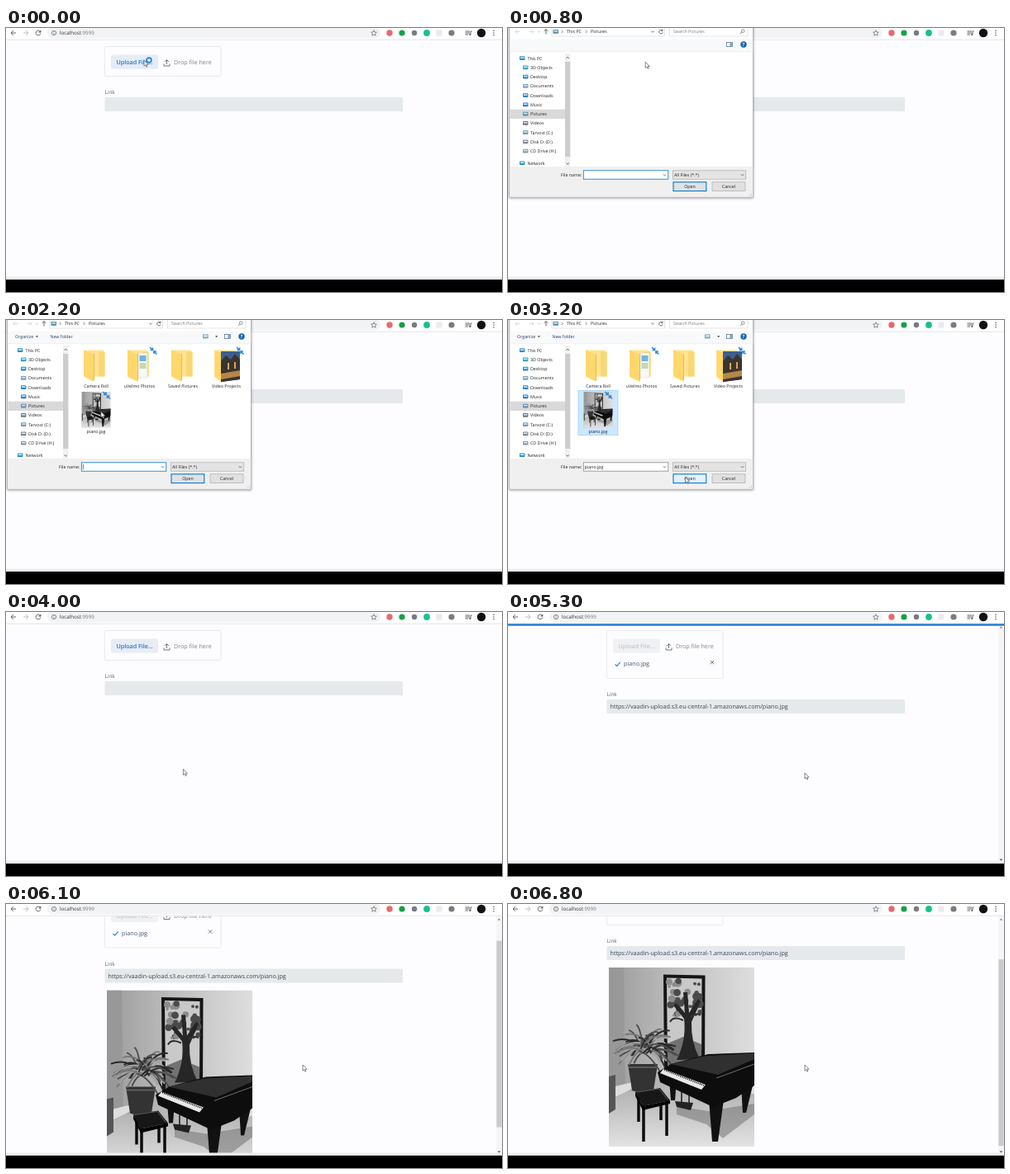
Animation, 600 px wide and 320 px high, one loop 7300 ms. Source, as an HTML page:

```html
<!DOCTYPE html>
<html lang="en">
<head>
<meta charset="utf-8">
<title>File upload</title>
<style>
  html, body { margin: 0; width: 100%; height: 100%; overflow: hidden; background: #fdfcfe; }
  svg { display: block; width: 600px; height: 320px; }
  text { font-family: "Open Sans", "Noto Sans", sans-serif; text-rendering: geometricPrecision; white-space: pre; }
</style>
</head>
<body>
<svg id="stage" viewBox="0 0 600 320" xmlns="http://www.w3.org/2000/svg"></svg>
<script>
const LOOP = 7300, STEP = 100;

// Markup helpers
const text = (x, y, s, size = 5.3, fill = '#222', more = '') =>
  `<text x="${x}" y="${y}" font-size="${size}" fill="${fill}" ${more}>${s}</text>`;
const rect = (x, y, w, h, fill, more = '') =>
  `<rect x="${x}" y="${y}" width="${w}" height="${h}" fill="${fill}" ${more}/>`;
const dot = (x, y, r, fill, more = '') => `<circle cx="${x}" cy="${y}" r="${r}" fill="${fill}" ${more}/>`;
const shape = (d, fill, more = '') => `<path d="${d}" fill="${fill}" ${more}/>`;
const line = (d, color, w = .8, more = '') =>
  `<path d="${d}" fill="none" stroke="${color}" stroke-width="${w}" ${more}/>`;
const group = (id, body, more = '') => `<g id="${id}" ${more}>${body}</g>`;
const use = (id, x, y, scale = 1) => `<use href="#${id}" transform="translate(${x} ${y}) scale(${scale})"/>`;
const range = (n, fn) => Array.from({ length: n }, (_, i) => fn(i)).join('');

function seeded(seed) {
  return () => (seed = (seed * 16807) % 2147483647) / 2147483647;
}

// Room with a piano, 176 x 217
function photo() {
  const rnd = seeded(41);
  const leaves = range(58, i => {
    const a = -Math.PI * (rnd() * 1.5 - .25), r = 17 + rnd() * 20;
    const x = 44 + (rnd() - .5) * 14, y = 90 + rnd() * 14;
    const ex = x + Math.cos(a) * r, ey = y + Math.sin(a) * r * .95;
    const tone = ['#292929', '#4c4c4c', '#777', '#a4a4a4'][i % 4];
    return line(`M${x} ${y}Q${(x + ex) / 2} ${(y + ey) / 2 - 8} ${ex} ${ey + 4}`, tone, 1.9, 'stroke-linecap="round"');
  });
  const foliage = range(34, i =>
    dot(72 + rnd() * 39, 16 + rnd() * 42, 1.5 + rnd() * 3.5, i % 3 ? '#4a4a4a' : '#8b8b8b'));
  return rect(0, 0, 176, 217, 'url(#wall)')
    + shape('M0 0H18L20 150L0 158Z', '#989898')
    + shape('M0 162L22 150L176 153V217H0Z', 'url(#floor)')
    + shape('M0 132L8 130V172L0 177Z', '#555')
    + shape('M8 144L28 139V147L8 157Z', '#ddd')
    + shape('M66 8.5L116.5 9.5L116 122L67 126Z', '#151515')
    + shape('M70 12.5L112.5 13.5L112 118L71 121Z', '#c9c9c9')
    + foliage
    + shape('M71 92L90 84L112 93V119H71Z', '#727272')
    + shape('M82 112Q94 88 91 62L78 46L82 43L92 55L90 30H95L97 55L108 38L111 41L100 66Q99 90 110 111Z', '#262626')
    + line('M90 64Q78 58 74 66M99 60Q106 54 111 58', '#303030', 2)
    + shape('M23 117H59L54 149Q40 154 28 149Z', '#333')
    + line('M24 121H58', '#666', 1.5)
    + leaves
    + shape('M82 168L120 174L176 165V178L138 207L118 190L82 178Z', '#6d6d6d', 'opacity=".5"')
    + shape('M73 136H82L80 161H75Z', '#111')
    + shape('M160 143H174L166 176H162Z', '#111')
    + shape('M121 160H139L132 211H125Z', '#111')
    + line('M88 151V167M97 154V169', '#222', 1.6)
    + shape('M80 162L102 164L99 173L82 169Z', '#222')
    + shape('M59 127L75 117L120 105L176 103V143L154 158L126 169L62 139Z', '#0d0d0d')
    + shape('M75 117L118 107L176 104V111L132 130Z', '#303030')
    + shape('M66 123L117 142L112 148L62 128Z', '#e8e8e8')
    + line('M67 124L115 143', '#222', 1.8, 'stroke-dasharray="1.2 1.1"')
    + line('M130 134L176 117', '#888', .8)
    + line('M42 165V211M70 159V204M36 153V187M63 165V185', '#0c0c0c', 3.5)
    + shape('M32 151L62 146L74 161L41 168Z', '#171717')
    + line('M34 151L61 147L71 160', '#777', .7)
    + shape('M32 151L41 168L74 161V165L41 173L32 156Z', '#050505');
}

const defs = `<defs>
  <linearGradient id="wall"><stop offset="0" stop-color="#9b9b9b"/><stop offset=".45" stop-color="#bdbdbd"/><stop offset="1" stop-color="#dedede"/></linearGradient>
  <linearGradient id="floor" x2="0" y2="1"><stop offset="0" stop-color="#b4b4b4"/><stop offset="1" stop-color="#e2e2e2"/></linearGradient>
  <filter id="shadow" x="-5%" y="-5%" width="112%" height="112%"><feDropShadow dx="0" dy="1" stdDeviation="1.4" flood-opacity=".4"/></filter>
  <clipPath id="view"><rect y="14.5" width="600" height="289"/></clipPath>
  <clipPath id="frame"><rect width="176" height="217"/></clipPath>
  <g id="photo" clip-path="url(#frame)">${photo()}</g>
  <g id="folder">${shape('M0 1H23L26 4V33H0Z', '#ffe394') + shape('M18 3H25V33H18Z', '#f9d775')
    + shape('M0 1L12 6V39L0 33Z', '#ffd76b') + shape('M12 6L13 5V37L12 39Z', '#e8bd50')}</g>
  <g id="doc">${shape('M0 0H22L30 8V40H0Z', '#f7f7f8', 'stroke="#d6d6d8" stroke-width=".7"')
    + shape('M22 0V8H30Z', '#e6e6e8', 'stroke="#d0d0d2" stroke-width=".5"')}</g>
  <g id="sync">${line('M0 0L3.4 3.4M3.6 .6V3.6H.6M8.5 8.5L5.1 5.1M4.9 7.9V4.9H7.9', '#2b8ae0', 1.5)}</g>
</defs>`;

function toolbar() {
  return rect(0, 0, 600, 14, '#fff') + rect(0, 13.7, 600, .8, '#dddfe2')
    + rect(50, -1, 403, 13.5, '#f1f3f4', 'rx="6.5"')
    + line('M12 6H6M8.8 3.2L6 6L8.8 8.8', '#50555a', .9)
    + line('M21 6H27M24.2 3.2L27 6L24.2 8.8', '#b5b8bb', .9)
    + line('M41.4 4.2A2.9 2.9 0 1 0 41.9 6.6', '#50555a', .9) + shape('M42.3 2.6V5.6H39.3Z', '#50555a')
    + dot(58, 6, 2.7, 'none', 'stroke="#5f6368" stroke-width=".7"') + line('M58 5.5V7.6M58 4.2V4.9', '#5f6368', .7)
    + text(65, 8.3, 'localhost<tspan fill="#74787c">:9999</tspan>', 6.2, '#303338')
    + shape('M445 2.7L446 5L448.4 5.2L446.6 6.8L447.1 9.2L445 7.9L442.9 9.2L443.4 6.8L441.6 5.2L444 5Z', 'none', 'stroke="#5f6368" stroke-width=".7"')
    + dot(464, 6, 3.7, '#e9686b') + dot(479, 6, 3.6, '#15a04a') + dot(494, 6, 3.2, '#777b80')
    + dot(509, 6, 3.9, '#18c28d') + rect(520.5, 2.5, 7, 7, '#eceaec')
    + dot(539, 6, 3.6, '#777c83')
    + line('M555.5 4H561M555.5 6H561M555.5 8H559M562 8V4H563.7', '#50555a', .9) + dot(561.2, 8.1, 1, '#50555a')
    + dot(575, 6, 5.2, '#111')
    + dot(590, 3.2, .8, '#50555a') + dot(590, 6, .8, '#50555a') + dot(590, 8.8, .8, '#50555a');
}

function page() {
  const link = 'https://vaadin-upload.s3.eu-central-1.amazonaws.com/piano.jpg';
  return rect(119.5, 22.5, 140.5, 36, 'none', 'id="card" rx="1.5" stroke="#e4e6ec" stroke-width=".8"')
    + rect(127, 32.5, 57, 17, '#e8edf5', 'id="button" rx="2"')
    + text(133.5, 44, 'Upload File...', 7.15, '#2374d2', 'id="caption" font-weight="600"')
    + line('M194.5 44V38.7M192 41.1L194.5 38.5L197 41.1M191 43.5V46H198V43.5', '#5f6c7e', .9)
    + text(203, 44, 'Drop file here', 7.16, '#7b8492')
    + group('item',
        line('M129.6 63.3L131.7 65.5L135.8 60.8', '#2374d2', 1.1, 'id="check"')
        + text(140, 65, 'piano.jpg', 7.2, '#45536a')
        + line('M244.8 58.8L249.2 63.2M249.2 58.8L244.8 63.2', '#66717f', .9)
        + group('upload', rect(140, 70.5, 108, 1.6, '#e5e9ef') + rect(140, 70.5, 0, 1.6, '#2374d2', 'id="done"')))
    + group('lower',
        text(119.5, 80, 'Link', 6.4, '#59677c', 'font-weight="500"')
        + rect(119.5, 84, 360.5, 17, '#e5e9eb', 'rx="1.5"')
        + text(123.5, 95, link, 7.18, '#34445a', 'id="link" font-weight="500"'))
    + group('picture', use('photo', 122, 132));
}

function scrollbar() {
  return rect(593, 14.5, 7, 289, '#f5f4f6') + rect(593.4, 22, 6.2, 226, '#cbcacc', 'id="thumb"')
    + shape('M594.8 19.5H598.2L596.5 17.6Z', '#777') + shape('M594.6 299.5H598.4L596.5 301.7Z', '#555');
}

const places = ['This PC', '3D Objects', 'Desktop', 'Documents', 'Downloads', 'Music', 'Pictures', 'Videos',
  'Tarvost (C:)', 'Disk D: (D:)', 'CD Drive (H:)', 'Network'];
const tints = ['#2f8fce', '#35a6c8', '#1c88d8', '#7f9fb5', '#2b85d8', '#2a7fd0', '#5c8fae', '#6a7783', '#6f9bb8', '#808890', '#8f979d', '#2f8fce'];

function sidebar() {
  return rect(2.5, 98.7, 66.5, 11.3, '#d9d9d9')
    + places.map((name, i) => {
        const y = i === 11 ? 164 : 36.8 + i * 11.25, root = i % 11 === 0;
        const x = root ? 14 : 18;
        return rect(x, y - 2.5, 6.4, 4.6, tints[i], 'rx=".7"') + rect(x + 1, y - 1.5, 4.4, 1.5, '#d7ecf8')
          + text(root ? 23.5 : 27, y + 1.9, name);
      }).join('')
    + rect(69, 31, 6.3, 137, '#f0f0f0') + rect(69, 41, 6.3, 115, '#cdcdcd')
    + line('M70.5 36.8L72.2 35.1L73.9 36.8M70.5 163.5L72.2 165.2L73.9 163.5', '#555', .9);
}

function files() {
  const label = (x, y, s) => text(x, y, s, 5.3, '#222', 'text-anchor="middle"');
  return rect(137, 30, 49, 54.5, '#e5f3ff', 'id="hover"')
    + rect(85, 85.5, 48, 54, '#cce8ff', 'id="picked" stroke="#99d1ff" stroke-width=".8"')
    + use('folder', 94, 35.5) + use('folder', 147, 35.5) + use('folder', 200, 35.5)
    + group('plain', use('doc', 251.5, 34.5) + use('doc', 94, 89))
    + group('thumbs',
        rect(160, 40, 11, 30, '#f7f7f5', 'stroke="#ccc" stroke-width=".4"') + rect(161.5, 43, 8, 7, '#72b6d9')
        + rect(161.5, 52, 8, 7, '#c6d9b1') + shape('M147 36.5L159 41.5V74.5L147 68.5Z', '#ffd76b')
        + use('folder', 252.5, 35.5)
        + shape('M260 38H283V72L260 75Z', '#3d5f8b') + shape('M260 50L266 43L272 48L277 41L283 48V72L260 75Z', '#3b3430')
        + shape('M260 65L283 61V68L260 72Z', '#b78748') + rect(268, 52, 2, 8, '#d9a458') + rect(276, 51, 2, 8, '#d9a458')
        + shape('M252.5 36.5L260 40V74.5L252.5 69Z', '#ffd76b')
        + use('photo', 91.5, 87, .2)
        + use('sync', 174, 33) + use('sync', 279, 33) + use('sync', 117.5, 87))
    + label(109, 81.8, 'Camera Roll') + label(161.5, 81.8, 'uVelmo Photos')
    + label(214, 81.8, 'Saved Pictures') + label(266.5, 81.8, 'Video Projects') + label(109, 136.7, 'piano.jpg');
}

function dialog() {
  return rect(1.8, -6, 294.7, 211, '#fff', 'filter="url(#shadow)" stroke="#9b9b9b" stroke-width=".7"')
    + rect(53, -1, 136.5, 11, '#fff', 'stroke="#d9d9d9" stroke-width=".7"')
    + rect(195.5, -1, 94.5, 11, '#fff', 'stroke="#d9d9d9" stroke-width=".7"')
    + line('M14.5 4.5H9M11.3 2.2L9 4.5L11.3 6.8M25.5 4.5H31M28.7 2.2L31 4.5L28.7 6.8', '#d0d0d0', .8)
    + line('M36.2 3.8L37.5 5.1L38.8 3.8', '#aaa', .7)
    + line('M46 7.5V1.5M43.7 3.8L46 1.5L48.3 3.8', '#555', .9)
    + rect(54.5, 2, 6.5, 4.8, '#5c8fae') + rect(55.5, 3, 4.5, 1.5, '#d7ecf8')
    + line('M64.7 2.8L66.3 4.4L64.7 6M93.7 2.8L95.3 4.4L93.7 6', '#555', .7)
    + text(71, 6.3, 'This PC') + text(100, 6.3, 'Pictures')
    + line('M173.3 3.6L175 5.3L176.7 3.6', '#555', .8)
    + line('M186.7 3A2.3 2.3 0 1 0 187.2 5.2M187 1.5V3.5H185', '#555', .8)
    + text(200, 6.3, 'Search Pictures', 5.3, '#777')
    + dot(284.2, 3.6, 1.8, 'none', 'stroke="#666" stroke-width=".7"') + line('M282.8 5L280.8 7', '#666', .8)
    + rect(2.2, 13.5, 294, 15, '#f8f9fb') + rect(2.2, 28.5, 294, .6, '#e9e9ec')
    + group('tools', text(11, 22, 'Organize', 5.3, '#233d63') + shape('M35.7 19.3H39.1L37.4 21.3Z', '#555')
        + text(53.5, 22, 'New folder', 5.3, '#233d63')
        + rect(238, 17.4, 6.6, 5, '#7ca6c4') + rect(239, 18.4, 4.6, 2, '#e5f0cf') + shape('M253 19.3H256.4L254.7 21.3Z', '#444'))
    + rect(264.4, 17.4, 7, 5, '#fff', 'stroke="#48647d" stroke-width=".7"') + rect(268.2, 18, 3, 4.2, '#79b1dc')
    + dot(285, 20, 3.7, '#1766ad') + text(285, 22.1, '?', 5.8, '#fff', 'text-anchor="middle" font-weight="700"')
    + sidebar() + group('files', files())
    + rect(2.2, 168, 294, 36.7, '#f0f0f0')
    + text(64, 179.8, 'File name:')
    + rect(91.3, 172.8, 102.5, 10.4, '#fff', 'id="field" stroke-width=".8"')
    + line('M93.4 174.8V181.2', '#222', .6, 'id="caret"') + text(92.6, 179.8, 'piano.jpg', 5.3, '#222', 'id="chosen"')
    + rect(199.3, 172.8, 88.4, 10.4, '#e4e4e4', 'stroke="#adadad" stroke-width=".7"') + text(201, 179.8, 'All Files (*.*)')
    + line('M187.8 177.3L189.5 179L191.2 177.3M281.8 177.3L283.5 179L285.2 177.3', '#555', .8)
    + rect(200, 186.8, 39.8, 10.8, '#e1e1e1', 'id="open" stroke="#0078d7" stroke-width="1.1"')
    + text(220, 194, 'Open', 5.3, '#222', 'text-anchor="middle"')
    + rect(247, 186.8, 40, 10.8, '#e1e1e1', 'stroke="#adadad" stroke-width=".7"')
    + text(267, 194, 'Cancel', 5.3, '#222', 'text-anchor="middle"')
    + dot(294.5, 203, .5, '#aaa') + dot(294.5, 201, .5, '#aaa') + dot(292.5, 203, .5, '#aaa');
}

const stage = document.getElementById('stage');
stage.innerHTML = defs + rect(0, 0, 600, 320, '#fdfcfe')
  + `<g clip-path="url(#view)">${group('page', page())}${group('scrollbar', scrollbar())}</g>`
  + rect(0, 301.5, 600, 3.5, '#efeef0') + rect(0, 303.8, 600, 1.2, '#d8d8da') + rect(0, 305, 600, 15, '#000')
  + toolbar() + rect(0, 14.3, 0, 2.4, '#2078d6', 'id="loading"')
  + group('dialog', dialog())
  + group('cursor', shape('M0 0V7.2L1.7 5.7L2.8 8.2L3.9 7.7L2.8 5.3H5Z', '#fff', 'stroke="#555" stroke-width=".7"')
      + dot(6, 0, 2.9, 'none', 'id="busy" stroke="#2380d4" stroke-width="1.8"'));

const el = {};
stage.querySelectorAll('[id]').forEach(node => el[node.id] = node);
const show = (id, on) => el[id].setAttribute('display', on ? 'inline' : 'none');
const set = (id, name, value) => el[id].setAttribute(name, value);

// Progress from 0 to 1 between two times
const part = (t, a, b) => Math.min(1, Math.max(0, (t - a) / (b - a)));
const ease = p => (1 - Math.cos(Math.PI * p)) / 2;

const moves = [[700, 1400, 152, 83], [1800, 2300, 111, 114], [2600, 3100, 214.5, 190.5], [4200, 4900, 359, 195]];
function pointer(t) {
  let x = 167, y = 39;
  for (const [a, b, tx, ty] of moves) {
    const p = ease(part(t, a, b));
    x += (tx - x) * p;
    y += (ty - y) * p;
  }
  return [x, y];
}

function draw(t) {
  const [x, y] = pointer(t);
  const picked = t >= 2400, ready = t >= 1500, added = t >= 4100, linked = t >= 5200;
  set('cursor', 'transform', `translate(${x} ${y})`);
  show('busy', t < 500);

  show('dialog', t >= 400 && t < 3500);
  show('files', t >= 900);
  show('tools', ready);
  show('thumbs', ready);
  show('plain', !ready);
  show('hover', x > 137 && x < 186 && y > 30 && y < 85);
  show('picked', picked);
  show('chosen', picked);
  show('caret', !picked && Math.floor((t + 300) / 500) % 2 === 1);
  set('field', 'stroke', picked ? '#8a8a8a' : '#0078d7');
  set('open', 'fill', x > 200 && y > 186 ? '#e5f1fb' : '#e1e1e1');

  set('button', 'fill', added ? '#f0f1f4' : t < 400 ? '#e4ecf5' : '#e8edf5');
  set('caption', 'fill', added ? '#c2c7cf' : '#2374d2');
  set('card', 'height', added ? 58 : 36);
  set('lower', 'transform', `translate(0 ${added ? 22 : 0})`);
  show('item', added);
  show('upload', t < 4700);
  show('check', t >= 4700);
  set('done', 'width', 108 * part(t, 4100, 4600));
  show('link', linked);
  set('loading', 'width', t >= 5500 ? 0 : linked ? 600 : 430 * Math.sin(part(t, 4400, 5200) * Math.PI / 2));

  const scroll = 55 * ease(part(t, 5700, 6500));
  set('page', 'transform', `translate(0 ${-scroll})`);
  show('picture', t >= 5400);
  show('scrollbar', t >= 5300);
  show('thumb', t >= 5400);
  set('thumb', 'y', 22 + scroll * .82);
}

function tick(now) {
  draw(Math.floor((now % LOOP) / STEP) * STEP);
  requestAnimationFrame(tick);
}
draw(0);
requestAnimationFrame(tick);
</script>
</body>
</html>
```
